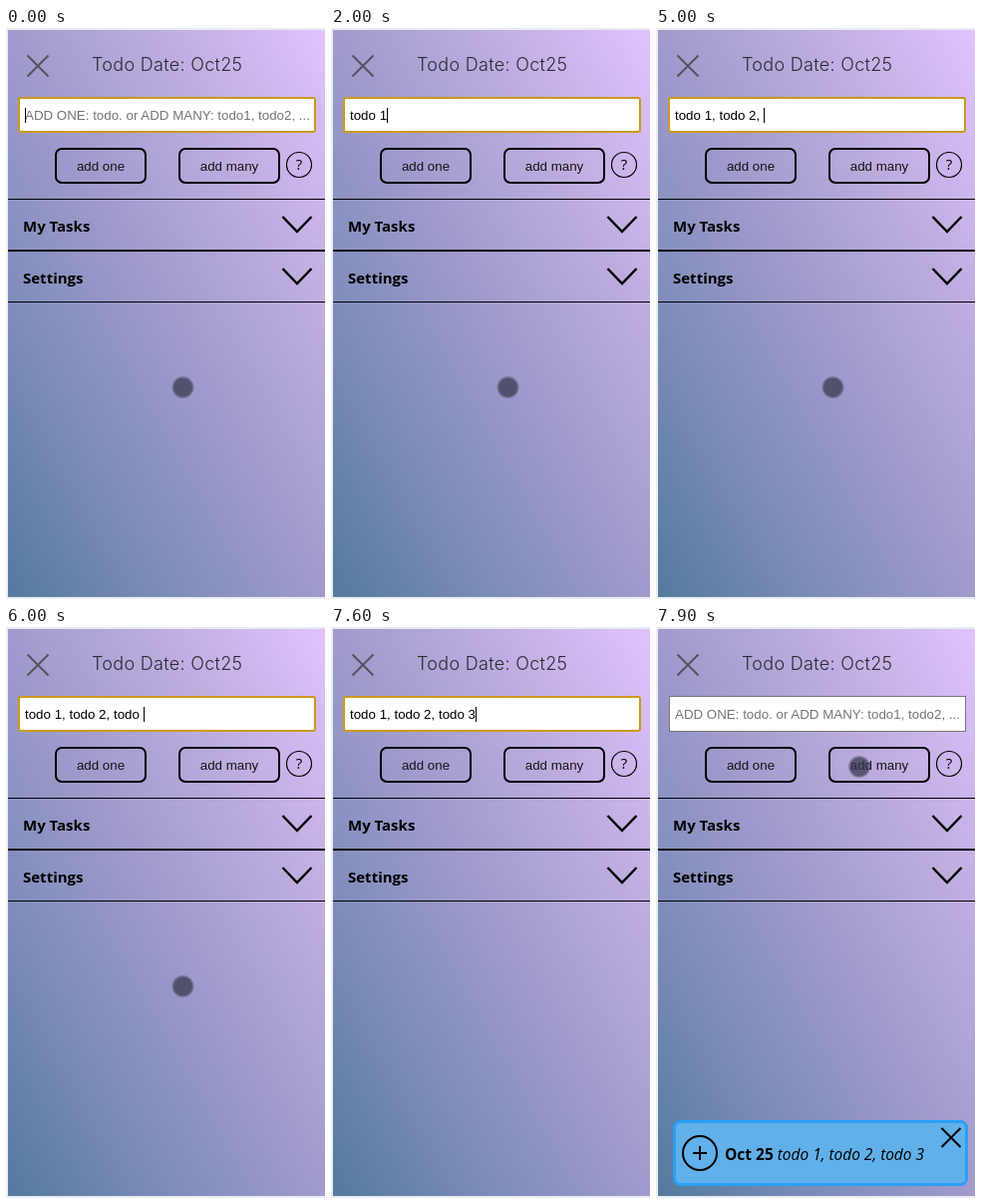
Recreate the animation shown at these times as an HTML page. Size 320 by 572 pixels, loop 8000 ms.

```html
<!DOCTYPE html>
<html lang="en">
<head>
<meta charset="utf-8">
<title>Todo list</title>
<style>
  html, body { margin: 0; width: 100%; height: 100%; overflow: hidden; background: #e9edf2; }
  svg { display: block; width: 320px; height: 572px; }
  text { white-space: pre; }
  .title { font: 300 18px Inter, sans-serif; letter-spacing: .3px; fill: #2c2b38; }
  .field { font: 13.333px "Liberation Sans", Arial, sans-serif; }
  .button { font: 13.333px "Liberation Sans", Arial, sans-serif; text-anchor: middle; fill: #151515; }
  .heading { font: 700 15px "Open Sans", sans-serif; }
  .task { font: 15.5px "Open Sans", sans-serif; }
  .line { fill: none; stroke: #000; stroke-width: 2; }
</style>
</head>
<body>
<svg viewBox="0 0 320 572">
  <defs>
    <linearGradient id="sky" x1="0" y1="1" x2="1" y2="0">
      <stop offset="0" stop-color="#547a9c"/>
      <stop offset=".25" stop-color="#7c8cb9"/>
      <stop offset=".5" stop-color="#a09bcc"/>
      <stop offset=".75" stop-color="#bfaee0"/>
      <stop offset="1" stop-color="#e0c3ff"/>
    </linearGradient>
  </defs>
  <rect width="320" height="572" fill="#e9edf2"/>
  <rect x="2" y="2" width="318" height="568" fill="url(#sky)"/>

  <path class="line" d="M21.5 27.5 42.5 48.5M42.5 27.5 21.5 48.5" style="stroke:#55535f"/>
  <text class="title" x="86" y="43">Todo Date: Oct25</text>

  <rect id="plainField" x="13.5" y="69.5" width="297" height="35" fill="#fff" stroke="#767676"/>
  <rect id="focusedField" x="13" y="70" width="297" height="34" rx="2" fill="#fff" stroke="#cc9a1c" stroke-width="2"/>
  <text id="hint" class="field" x="19" y="92" fill="#757575">ADD ONE: todo. or ADD MANY: todo1, todo2, ...</text>
  <text id="entry" class="field" x="19" y="92"></text>
  <rect id="caret" y="80" width="1" height="15"/>

  <rect class="line" x="50" y="121" width="90" height="34" rx="6"/>
  <text class="button" x="95" y="143">add one</text>
  <rect class="line" x="174" y="121" width="100" height="34" rx="6"/>
  <text class="button" x="224" y="143">add many</text>
  <rect id="highlight" x="173" y="120" width="102" height="36" rx="7" fill="#33b5e5"/>
  <circle class="line" cx="294" cy="137" r="12.5" style="stroke-width:1.2"/>
  <text x="294" y="142" text-anchor="middle" style="font:15px 'Open Sans',sans-serif">?</text>

  <path d="M2 171h318v1H2zM2 222h318v2H2zM2 274h318v1H2z"/>
  <text class="heading" x="17" y="204">My Tasks</text>
  <text class="heading" x="17" y="256">Settings</text>
  <path class="line" d="M277.5 189 292 204 306.5 189M277.5 241 292 256 306.5 241" style="stroke-width:2.5"/>

  <g id="card">
    <rect x="18.5" y="495.5" width="293" height="63" rx="6" fill="#62b0ea" stroke="#2b9ff6" stroke-width="3"/>
    <text id="task" class="task" y="534"><tspan font-weight="700">Oct 25</tspan> <tspan font-style="italic">todo 1, todo 2, todo 3</tspan></text>
    <path id="icons" class="line" d="M27 527a17 17 0 1 0 34 0a17 17 0 1 0-34 0M37 527h14M44 520v14M286.5 502 305.5 521M305.5 502 286.5 521"/>
  </g>

  <g id="touch">
    <circle r="11" fill="#3c3c50" fill-opacity=".4"/>
    <circle r="9.5" fill="#33344a" fill-opacity=".55"/>
  </g>
</svg>
<script>
const LOOP = 8000, BLINK = 500, SENT = 7700;
const message = "todo 1, todo 2, todo 3";
// One time per typed character.
const keyTimes = [700, 900, 1300, 1400, 1500, 2000, 2600, 2700, 3000, 3200, 3500, 3600,
  4000, 4200, 4700, 4800, 5300, 5400, 5700, 5800, 6000, 6600];
// [start, end, x, y] of each visible touch.
const touches = [[0, 6900, 177.5, 360], [7200, 7300, 204, 146], [7300, 7400, 204, 140], [SENT, LOOP, 204, 140]];

const el = id => document.getElementById(id);
const show = (id, on) => el(id).setAttribute("visibility", on ? "inherit" : "hidden");
const set = (id, name, value) => el(id).setAttribute(name, value);

function drawField(t) {
  const sent = t >= SENT;
  const count = sent ? 0 : keyTimes.filter(k => k <= t).length;
  const lastKey = count ? keyTimes[count - 1] : -100;
  el("entry").textContent = message.slice(0, count);
  const width = count ? el("entry").getComputedTextLength() : 0;
  set("caret", "x", Math.round(19 + width));
  show("caret", !sent && Math.floor((t - lastKey) / BLINK) % 2 === 0);
  show("hint", count === 0);
  show("focusedField", !sent);
  show("plainField", sent);
}

function drawCard(t) {
  const ready = t >= SENT + 100;
  show("card", t >= SENT);
  show("icons", ready && t >= SENT);
  set("task", "x", ready ? 69 : 29);
  set("highlight", "opacity", t < SENT || t >= SENT + 200 ? 0 : ready ? .25 : .45);
}

function drawTouch(t) {
  const touch = touches.find(([start, end]) => t >= start && t < end);
  show("touch", touch);
  if (touch) set("touch", "transform", `translate(${touch[2]} ${touch[3]})`);
}

function render(t) {
  drawField(t);
  drawCard(t);
  drawTouch(t);
}

const start = performance.now();
function tick() {
  render((performance.now() - start) % LOOP);
  requestAnimationFrame(tick);
}
tick();
</script>
</body>
</html>
```
